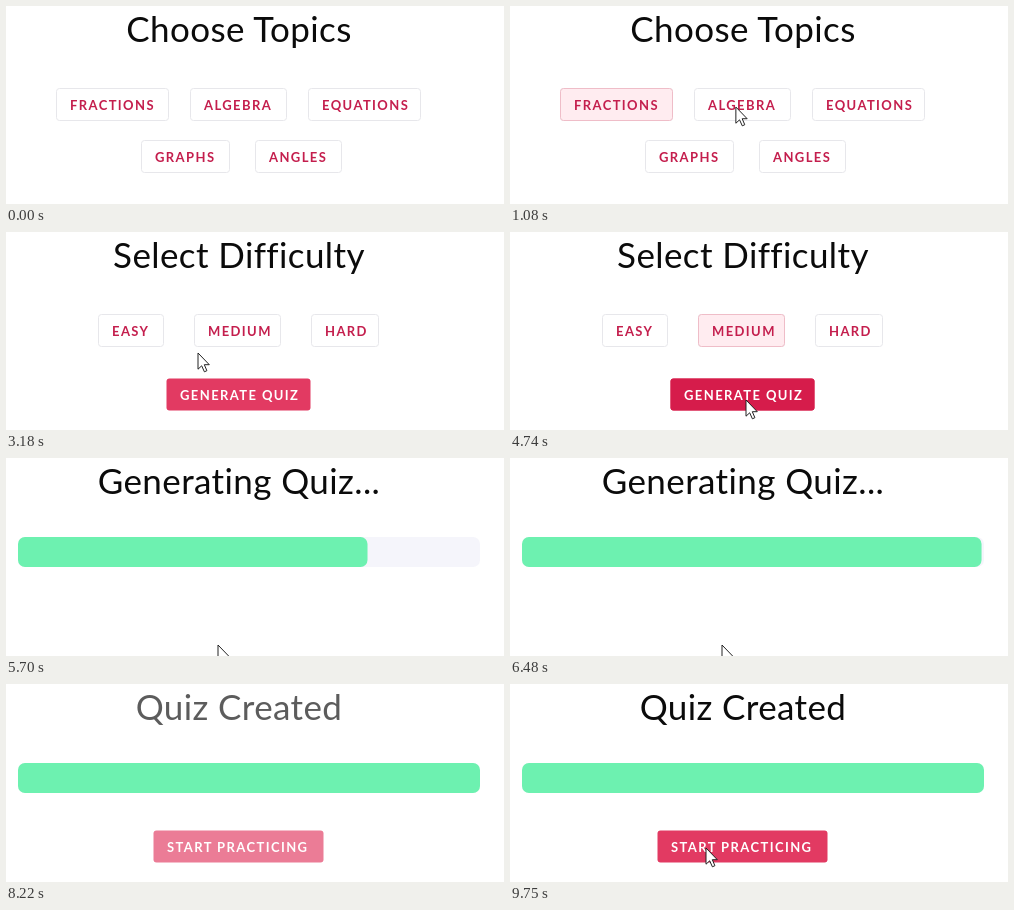
Write an HTML page that moves like this. It is 498 px wide and 198 px high and loops after 9840 ms.

```html
<!DOCTYPE html>
<html lang="en">
<head>
<meta charset="utf-8">
<title>Quiz builder</title>
<style>
  html, body { margin: 0; width: 100%; height: 100%; overflow: hidden; background: #fff; }
  svg { display: block; }
  text { font-family: Lato, "Open Sans", sans-serif; }
  .title { font-size: 35px; letter-spacing: .4px; text-anchor: middle; fill: #0b0b0b; }
  .label { font-size: 13px; font-weight: 700; letter-spacing: 1.4px; fill: #c41e4d; }
  .chip { fill: #fff; stroke: #e7e7eb; }
  .picked { fill: #ffecf0; stroke: #efbdc8; }
  .solid { fill: #e23a62; }
  .dark { fill: #d61c4b; }
  .solid ~ .label { fill: #fff; }
</style>
</head>
<body>
<svg id="stage" width="498" height="198" viewBox="0 0 498 198">
  <g id="bar">
    <rect x="12" y="79" width="462" height="30" rx="7" fill="#f5f5fb"/>
    <rect id="fill" x="12" y="79" height="30" rx="7" fill="#6df1b0"/>
  </g>
  <path id="cursor" d="M0 0V16.2L3.7 12.8 6.4 18.8 8.9 17.7 6.3 11.7H11.3Z"
    fill="#fff" stroke="#222" stroke-linejoin="round"/>
</svg>
<script>
const LOOP = 9840;
const $ = id => document.getElementById(id);
const stage = $('stage'), cursor = $('cursor');

function add(parent, tag, attrs, text = '') {
  const el = document.createElementNS('http://www.w3.org/2000/svg', tag);
  for (const key in attrs) el.setAttribute(key, attrs[key]);
  el.textContent = text;
  return parent.appendChild(el);
}

function scene(title) {
  const g = add(stage, 'g', {});
  add(g, 'text', { class: 'title', x: 233, y: 36 }, title);
  return g;
}

// Each button has a base face and an active face that fades in above it.
function button(parent, text, x, y, width, base = 'chip', active = 'picked') {
  const g = add(parent, 'g', {});
  const box = { x: x + .5, y: y + .5, width: width - 1, height: 32, rx: 3 };
  add(g, 'rect', { ...box, class: base });
  const face = add(g, 'rect', { ...box, class: active, opacity: 0 });
  add(g, 'text', { class: 'label', x: x + 14, y: y + 21.5 }, text);
  return face;
}

const topics = scene('Choose Topics');
const fractions = button(topics, 'FRACTIONS', 50, 82, 113);
button(topics, 'ALGEBRA', 184, 82, 97);
const equations = button(topics, 'EQUATIONS', 302, 82, 113);
button(topics, 'GRAPHS', 135, 134, 89);
button(topics, 'ANGLES', 249, 134, 87);

const levels = scene('Select Difficulty');
button(levels, 'EASY', 92, 82, 66);
const medium = button(levels, 'MEDIUM', 188, 82, 87);
button(levels, 'HARD', 305, 82, 68);
const generate = button(levels, 'GENERATE QUIZ', 160, 146, 145, 'solid', 'dark');

const working = scene('Generating Quiz...');
const done = scene('Quiz Created');
button(done, 'START PRACTICING', 147, 146, 171, 'solid', 'dark');
stage.append(cursor);

// Cursor stops: time, x, y
const path = [
  [330, 160, 200], [750, 122, 102], [880, 122, 102], [1290, 336, 100],
  [1500, 336, 100], [2040, 288, 184], [2280, 262, 200], [2700, 235, 200],
  [3180, 192, 121], [3360, 222, 103], [3650, 222, 103], [4350, 236, 168],
  [4900, 236, 168], [5600, 212, 187], [6720, 212, 187], [6900, 206, 200],
  [9150, 216, 200], [9690, 196, 164]
];

const ramp = (t, a, b) => Math.min(1, Math.max(0, (t - a) / (b - a)));
const smooth = p => p * p * (3 - 2 * p);
const show = (el, value) => el.setAttribute('opacity', value);

function cursorAt(t) {
  const i = path.findIndex(stop => stop[0] > t);
  if (i < 0) return path[path.length - 1].slice(1);
  if (i === 0) return path[0].slice(1);
  const [a, x, y] = path[i - 1], [b, u, v] = path[i];
  const p = smooth(ramp(t, a, b));
  return [x + (u - x) * p, y + (v - y) * p];
}

function draw(t) {
  show(topics, 1 - ramp(t, 2460, 2680));
  show(levels, ramp(t, 2680, 2980) * (1 - ramp(t, 4780, 4970)));
  show(working, ramp(t, 4970, 5230) * (1 - ramp(t, 6720, 7180)));
  show(done, ramp(t, 7770, 8450));
  show($('bar'), ramp(t, 4970, 5150));

  show(fractions, ramp(t, 770, 920));
  show(equations, ramp(t, 1340, 1500));
  show(medium, ramp(t, 3450, 3640));
  show(generate, ramp(t, 4130, 4380));

  const progress = 1 - (1 - ramp(t, 4950, 6700)) ** 2.52;
  $('fill').setAttribute('width', 462 * progress);
  cursor.setAttribute('transform', `translate(${cursorAt(t)})`);
}

const start = performance.now();
function tick() {
  draw((performance.now() - start) % LOOP);
  requestAnimationFrame(tick);
}
tick();
</script>
</body>
</html>
```
